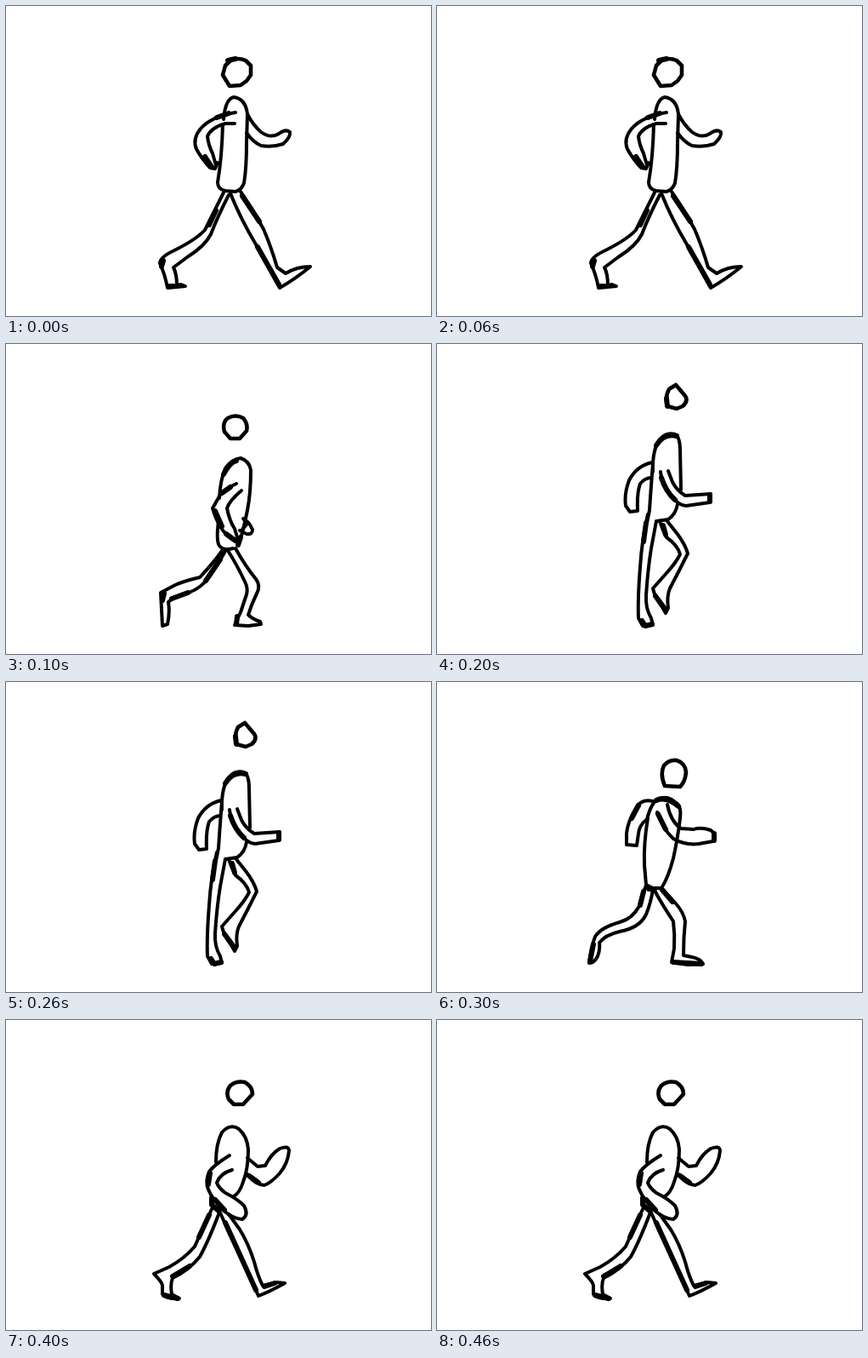
These frames come from a looping animation (500x364 px, 500 ms). An HTML page:

```html
<!DOCTYPE html>
<html lang="en">
<head>
<meta charset="utf-8">
<title>Walk cycle</title>
<style>
  html, body { margin: 0; width: 100%; height: 100%; overflow: hidden; background: #fff; }
  svg { display: block; width: 500px; height: 364px; }
  path { fill: none; stroke: #000; stroke-width: 4; stroke-linecap: round; stroke-linejoin: round; }
  .head { stroke-width: 4.6; }
  .bold { stroke-width: 6; }
  .pose { opacity: 0; }
</style>
</head>
<body>
<svg viewBox="0 0 500 364">
  <!-- long stride -->
  <g class="pose">
    <path class="head" d="M264 64Q273 60 282 64L288 70V81L283 88L276 93L263 94L255 81L258 70Z"/>
    <path d="M256 133Q258 109 268 107Q282 109 284 127L283 160Q283 190 280 208Q277 216 270 218L258 217Q249 215 249 207Q254 178 255 139"/>
    <path d="M270 125Q241 130 229 144Q219 156 224 168Q230 179 240 190L246 191L249 184M269 138H258Q241 143 237 153Q238 163 243 173L247 187"/>
    <path d="M284 127Q290 139 300 148Q311 156 321 150Q329 144 334 148Q335 154 326 162Q314 166 300 164Q291 160 283 149"/>
    <path d="M256 219L245 241L234 263Q224 274 198 287Q181 295 181 302Q187 315 190 331L211 329L206 327L201 328Q201 315 197 307L213 295Q234 282 241 268Q249 247 262 222"/>
    <path d="M264 220Q276 250 294 280L322 331Q341 320 358 306Q342 306 329 314L319 307Q312 283 303 262Q291 240 276 218"/>
    <path class="bold" d="M296 283L321 327M278 223L298 253M262 126L248 131M234 177L242 189M247 240L239 257M185 299L183 306M261 64L270 62M192 329H199"/>
  </g>

  <!-- down -->
  <g class="pose">
    <path class="head" d="M264 111L257 103Q254 92 261 87Q270 82 279 87Q285 94 283 102L275 111Z"/>
    <path d="M251 181Q252 160 258 146Q266 135 276 134Q286 137 288 148Q288 175 284 195Q278 225 273 237M250 208Q247 231 251 237Q256 243 267 240"/>
    <path d="M271 164Q258 170 252 177L243 193Q248 210 256 220Q264 229 271 232M277 172Q262 185 260 193Q263 208 269 217L273 230"/>
    <path d="M279 205Q286 208 290 218Q290 224 283 223L275 219M280 206L283 212L277 219"/>
    <path d="M254 243Q245 256 228 274Q210 278 199 283L182 292L184 331L190 329Q193 315 191 303Q195 298 215 292Q231 286 240 272Q251 256 258 243"/>
    <path d="M260 241Q270 256 281 279Q285 287 283 294L276 315L269 330L285 331L300 329L299 326Q290 323 285 318Q289 305 295 293Q300 284 294 276Q281 260 270 240"/>
    <path class="bold" d="M254 175L264 168M246 196L254 214M256 153Q263 139 271 137M259 223L270 231M195 299L214 292M235 278L252 253M272 320L271 329M186 293L184 301M273 236L276 227"/>
  </g>

  <!-- passing -->
  <g class="pose">
    <path class="head" d="M281 48L292 61Q296 67 289 73L282 76L271 73Q268 62 273 53Z"/>
    <path d="M254 150Q253 125 262 112Q270 103 280 106Q286 109 286 125L287 171M283 188Q281 200 272 206L258 208M254 140Q252 165 250 195L247 210"/>
    <path d="M253 139Q235 143 226 160Q220 176 222 190L227 197L236 196Q235 175 239 164Q245 157 252 157"/>
    <path d="M263 150Q264 165 275 178Q285 190 293 190L321 186L322 176L292 178Q282 172 277 162L272 149"/>
    <path d="M248 200Q241 230 239 262Q236 300 237 322L242 331L254 330L252 322Q245 310 246 295Q248 265 252 240L258 208"/>
    <path d="M262 208Q265 218 270 227Q283 236 286 247Q281 257 270 269L254 287Q256 297 265 309L269 316L272 310Q270 296 274 287Q284 268 295 246Q292 235 282 222L270 207"/>
    <path class="bold" d="M258 119Q267 104 282 108M264 157Q269 173 280 183M321 177V185M266 213L269 224M241 325L245 331L253 329M257 296L269 312M246 210L243 232M271 73L270 64"/>
  </g>

  <!-- reach -->
  <g class="pose">
    <path class="head" d="M268 122Q262 108 267 98Q273 91 282 92Q292 95 293 106Q292 117 286 123Z"/>
    <path d="M247 161Q252 142 260 137Q272 133 280 141Q288 145 286 160Q283 185 278 207Q272 230 264 242H254L246 238L244 215Q243 190 248 160"/>
    <path d="M254 140Q240 137 234 148Q224 165 223 178V191L235 192L237 178Q238 168 246 162"/>
    <path d="M259 153Q265 172 278 184Q292 192 308 190L325 187Q328 178 322 174Q310 170 302 173L287 172Q275 164 271 144"/>
    <path d="M246 239Q240 252 238 263Q230 278 215 282Q193 288 186 299Q181 312 179 330Q185 330 189 322Q192 315 191 306Q198 297 215 293Q238 289 246 273Q252 258 254 243"/>
    <path d="M255 243Q264 260 278 281Q280 297 279 313L276 329L295 332L313 331Q310 325 300 323L290 321Q290 300 292 281Q290 270 280 259L264 242"/>
    <path class="bold" d="M258 139Q270 134 284 146M260 155L269 173M326 178V186M243 246L239 262M184 308L180 328M278 329L311 331M237 145L229 160M265 244L277 258M249 243L256 243"/>
  </g>

  <!-- heel strike -->
  <g class="pose">
    <path class="head" d="M268 99L262 93Q258 84 264 77Q271 71 281 73Q290 78 290 87L279 99Z"/>
    <path d="M247 167Q247 145 254 132Q264 121 274 128Q284 137 285 152Q285 175 279 190Q275 203 268 207"/>
    <path d="M263 159Q245 170 239 178Q234 190 238 199Q243 211 255 223Q268 234 278 234Q286 229 280 218Q272 210 258 203Q250 197 248 191Q252 180 266 176"/>
    <path d="M284 162L296 172L305 171Q312 157 322 151Q332 147 333 153Q332 168 322 180Q312 191 304 194Q292 193 284 181"/>
    <path d="M243 220Q232 243 222 266Q210 280 192 290L174 298Q184 308 184 312V322Q188 328 204 327L195 322Q193 310 196 303Q215 294 228 278Q238 260 251 226"/>
    <path d="M251 224Q262 250 275 276L297 324Q310 319 328 309L318 308L302 312Q296 300 292 284Q285 262 275 246L262 228"/>
    <path class="bold" d="M242 209V217L250 224M258 238L294 317M239 229L227 255M196 301L216 289M186 323L202 327M246 211L257 223M286 183L297 191M304 313L316 309M240 180L238 193"/>
  </g>
</svg>
<script>
  const HOLD = 100;
  const poses = [...document.querySelectorAll('.pose')];
  const loop = HOLD * poses.length;
  const share = 1 / poses.length;

  // Each pose is shown for its own slice of the loop.
  const slot = [
    { opacity: 1, offset: 0 },
    { opacity: 1, offset: share },
    { opacity: 0, offset: share },
    { opacity: 0, offset: 1 }
  ];
  poses.forEach((pose, i) => {
    const run = pose.animate(slot, { duration: loop, delay: i * HOLD - loop, iterations: Infinity });
    run.startTime = document.timeline.currentTime;
  });
</script>
</body>
</html>
```
